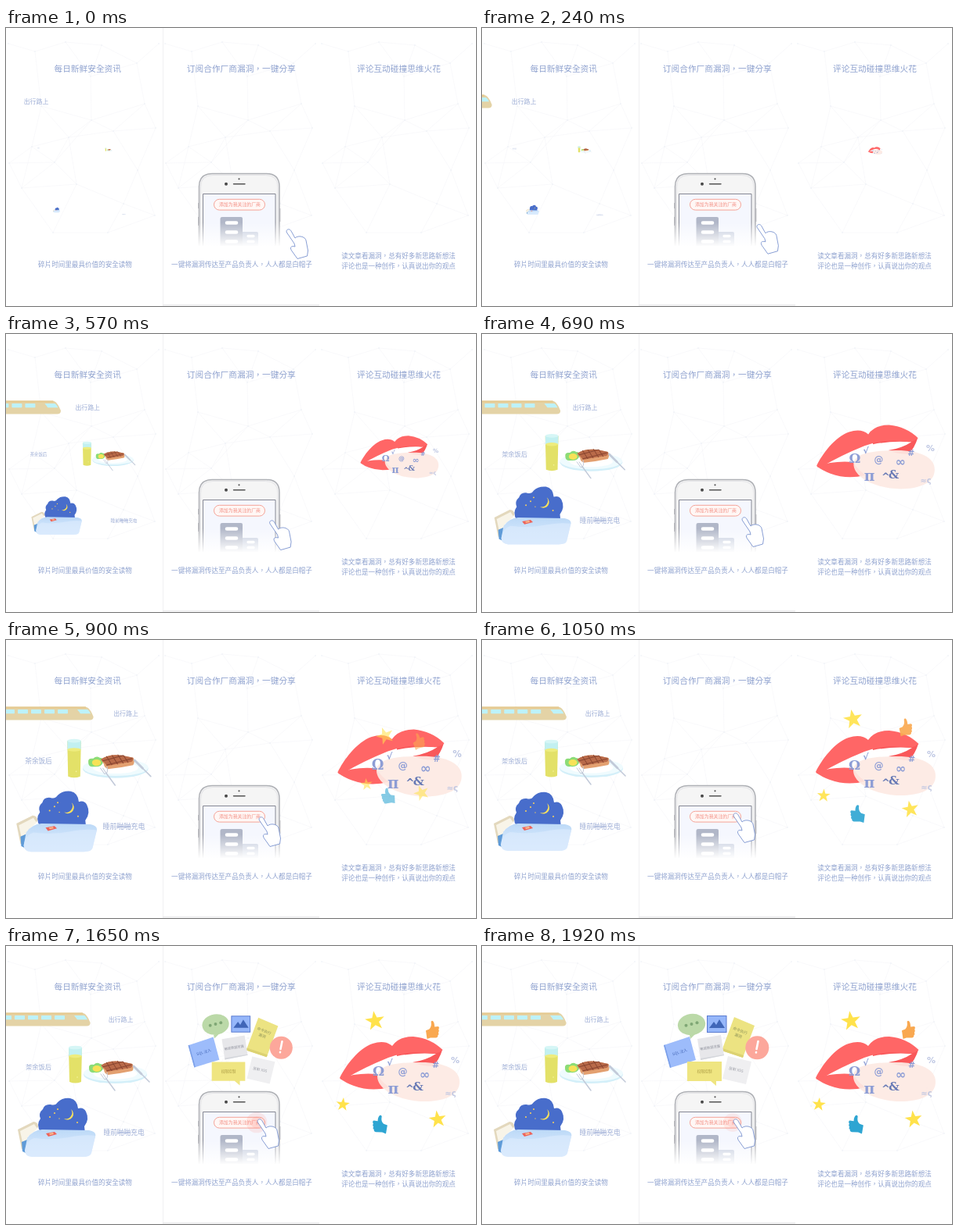
Recreate the animation shown at these times as an HTML page. Size 600 by 356 pixels, loop 8000 ms.

```html
<!DOCTYPE html>
<html lang="zh-TW">
<head>
<meta charset="utf-8">
<style>
html, body { margin: 0; width: 100%; height: 100%; overflow: hidden; background: #fff; }
svg { display: block; width: 600px; height: 356px; }
text { font-family: "Noto Sans CJK TC", "Noto Sans CJK", sans-serif; fill: #8fa2cf; text-anchor: middle; }
.title { font-size: 10.7px; }
.note { font-size: 8.57px; }
.label { font-size: 8.3px; fill: #9dadd5; }
.card { font-size: 4.8px; }
.sym text { font-family: "DejaVu Sans", sans-serif; fill: #8d9dd5; font-weight: bold; }
.sym .serif { font-family: "DejaVu Serif", serif; }
</style>
</head>
<body>
<svg viewBox="0 0 600 356">
  <defs>
    <linearGradient id="fade" x2="0" y2="1">
      <stop stop-color="#fff" stop-opacity="0"/><stop offset="1" stop-color="#fff"/>
    </linearGradient>
    <linearGradient id="quilt" x2="0" y2="1">
      <stop stop-color="#bcd9f7"/><stop offset=".5" stop-color="#cfe4fb"/><stop offset="1" stop-color="#d8eafd"/>
    </linearGradient>
    <path id="thumb" d="M-9 0L-4-1C0-4 0-7 0-10C2-13 5-10 4-3L9-3C11-2 10 0 9 1C10 3 9 4 8 5C9 7 8 8 7 8C7 10 6 11 4 11L-4 10L-9 11Z"/>
  </defs>

  <g id="net" stroke="#f6f7fa" stroke-width=".7" fill="#ebeef5"></g>
  <path d="M200.5 0V356" stroke="#f0f0f2"/>
  <path d="M200 354.7H400" stroke="#ebebed" stroke-width="1.6"/>

  <text class="title" x="104.2" y="56">每日新鲜安全资讯</text>
  <text class="title" x="300.3" y="56">订阅合作厂商漏洞，一键分享</text>
  <text class="title" x="501.5" y="56">评论互动碰撞思维火花</text>
  <text class="note" x="101" y="306">碎片时间里最具价值的安全读物</text>
  <text class="note" x="301" y="306">一键将漏洞传达至产品负责人，人人都是白帽子</text>
  <text class="note" x="501" y="295">读文章看漏洞，总有好多新思路新想法</text>
  <text class="note" x="501" y="307.5">评论也是一种创作，认真说出你的观点</text>

  <!-- Train -->
  <g id="train">
    <path d="M-20 85.5H97C102 86 105 92 107.5 98Q108 102 103 102.5H-20Z" fill="#e4d3a6"/>
    <path d="M-20 86.5H98" stroke="#e6c98f" stroke-width="2"/>
    <g id="windows" fill="#bdf2f9"></g>
    <path d="M87 89H100Q103 91 104 94.3H91Z" fill="#bdf2f9"/>
  </g>
  <text class="label" id="trainText" x="146.5" y="97" style="font-size:7.9px">出行路上</text>

  <!-- Meal -->
  <g id="meal">
    <path d="M80 130L81 174Q88.5 177 96 174L97 130Z" fill="#e3e168"/>
    <path d="M80 130L80.2 141Q88.5 144 96.800 141L97 130Z" fill="#c2f0f1"/>
    <ellipse cx="88.5" cy="130" rx="8.5" ry="2.3" fill="#d6f6f6"/>
    <ellipse cx="88.5" cy="141" rx="8.2" ry="2.2" fill="#eeec7d"/>
    <circle cx="91" cy="168" r=".8" fill="#f5f3a0"/>
    <ellipse cx="139.5" cy="164.5" rx="40.5" ry="11.5" fill="#d3eff9"/>
    <ellipse cx="139.5" cy="163" rx="40.5" ry="10.5" fill="#effbfe"/>
    <ellipse cx="139.5" cy="163.5" rx="28" ry="7" fill="#fff"/>
    <path d="M106 157Q105 151 112 152Q116 148 120 151Q126 151 124 157Q122 163 113 162Q106 163 106 157Z" fill="#8cdc77"/>
    <ellipse cx="116" cy="157" rx="5.5" ry="4" fill="#f7e258"/>
    <g transform="translate(1.2 0)">
      <path d="M120 153Q130 146 146 148L160 151Q163 155 160 160Q146 163 129 165Q124 163 124 159Z" fill="#e3a070"/>
      <path d="M120 153Q130 146 146 148L160 151Q161 154 158 156Q143 158 128 161Q124 156 120 153Z" fill="#b96a49"/>
      <path d="M127 149L134 160M134 148L141 159M141 147L148 158M148 148L154 157M122 155L148 148M127 160L159 152" stroke="#87442f"/>
    </g>
    <g stroke="#c2cad9" stroke-linecap="round" fill="none">
      <path d="M128 170L139 185" stroke-width="1.5"/>
      <path d="M121 164L126 171Q131 171 129 162M124 164L128 170"/>
      <path d="M163 154L173 164" stroke-width="2.8"/><path d="M173 164L183 174" stroke-width="1.6"/>
    </g>
  </g>
  <text class="label" id="mealText" x="41.5" y="157.5">茶余饭后</text>

  <!-- Bed -->
  <g id="bed">
    <path d="M44 238Q38 229 44 221Q41 214 47 209Q49 202 57 203Q63 205 66 200Q72 194 82 195Q91 197 92 208Q99 206 102 212Q107 222 100 231L101 240Z" fill="#486dcb"/>
    <path d="M83 209A7.5 7.5 0 1 1 74 221A8 8 0 0 0 83 209Z" fill="#ffe35a"/>
    <g fill="#f8d05d"><circle cx="66" cy="209" r="1"/><circle cx="62" cy="214" r="1"/><circle cx="56" cy="219" r="1"/><circle cx="91" cy="226" r="1"/><circle cx="68" cy="221" r=".7"/></g>
    <path d="M15 235L35 225Q41 225 41 232L28 240L27 264L20 260Z" fill="#e3d8bd"/>
    <path d="M18 237L36 228L40 234L28 244L27 260L22 256Z" fill="#f8f4e8"/>
    <path d="M20 251L27 248L29 267L21 263Z" fill="#5f9bd8"/>
    <path d="M27 246Q34 236 46 235L106 236Q116 238 114 244L109 265Q108 270 98 270L33 270Q24 269 24 262Z" fill="url(#quilt)"/>
    <path d="M24 262Q26 249 36 246Q60 249 80 245T114 243L109 265Q108 270 98 270L33 270Q25 269 24 262Z" fill="#dcecfd" opacity=".65"/>
    <path d="M51 240L62 238L65 241L54 244Z" fill="#ee6359"/><path d="M55 240L60 239L61 241L56 242Z" fill="#f8bb8d"/>
  </g>
  <text class="label" id="bedText" x="150.5" y="242.3" style="font-size:8.7px">睡前<tspan text-decoration="line-through">啪啪</tspan>充电</text>

  <!-- Phone -->
  <g stroke="#aeb0b5" fill="#fff">
    <path d="M246.5 290V203Q246.5 186.5 263 186.5H332.500Q349 186.5 349 203V290Z" stroke-width="1.5" fill="#f2f2f3"/>
    <path d="M248.5 290V204Q248.5 188.5 264 188.5H331.500Q347 188.5 347 204V290Z" stroke="#e0e0e2" stroke-width=".8" fill="#f5f5f5"/>
    <path d="M245.8 224V231M245.8 242V253M349.800 231V248"/>
    <path d="M251.5 290V212.5H344V290Z" stroke="#858793" fill="#f5f7fe"/>
  </g>
  <circle cx="297.5" cy="193.3" r="1.1" fill="#555"/><circle cx="281" cy="199.7" r="2" fill="#484848"/>
  <path d="M290.5 199.7H305" stroke="#555" stroke-width="1.4" stroke-linecap="round"/>
  <path d="M273.5 285V244Q273.5 242 276 242H300Q302 242 302 244V285Z" fill="#b1b7c8"/>
  <path d="M302 285V261H320Q322 261 322 263V285Z" fill="#c3cbdd"/>
  <path d="M282 249.5H294M282 261.5H294M282 273.5H294" stroke="#fff" stroke-width="4.6" stroke-linecap="round"/>
  <path d="M309 266.5H316M309 273.5H316" stroke="#fff" stroke-width="3.3" stroke-linecap="round"/>
  <rect x="240" y="249" width="115" height="31" fill="url(#fade)"/>
  <rect x="240" y="279" width="115" height="15" fill="#fff"/>
  <rect x="265.5" y="219.3" width="65" height="13.8" rx="6.9" fill="#fff7f5" stroke="#f5a398"/>
  <text x="298.5" y="228.4" style="font-size:5.9px;fill:#f28d82">添加为我关注的厂商</text>
  <g id="glow" fill="#ff7468"><circle cx="320" cy="226" r="14" opacity=".17"/><circle cx="320" cy="226" r="8" opacity=".2"/></g>
  <path id="hand" d="M321.5 226C319.5 222 325 220 327 224L332 233C336 229 345 231 346 236L348.500 249L347.500 256L335 259.500L329 251C324 245 327 242.5 332 244L331 240Z" fill="#fff" stroke="#7b93d0" stroke-width=".9" stroke-linejoin="round"/>

  <!-- Cards -->
  <g class="pop" data-at="267,102">
    <path d="M265 114L266 119L273 112Z" fill="#bbd9a8"/><ellipse cx="267.5" cy="100.5" rx="17.7" ry="13.6" fill="#bbd9a8" transform="rotate(-8 267 100)"/>
    <g fill="#7fa775"><circle cx="260.5" cy="101.8" r="2"/><circle cx="267.5" cy="100" r="2"/><circle cx="274.5" cy="98.2" r="2"/></g>
  </g>
  <g class="pop" data-at="300,100">
    <rect x="287.5" y="89.5" width="24.500" height="21" fill="#96b7fa" stroke="#5a7bd0"/>
    <path d="M290 105L296 97L299 101L303 94L310 105Z" fill="#4066b8"/>
  </g>
  <g class="pop" data-at="327,117">
    <path d="M322 91L348 102L333 143L306 134Z" fill="#ece382"/><path d="M306 134L333 143L334 140L307 131Z" fill="#dcd272"/>
    <g transform="translate(329 110) rotate(22)"><text class="card" style="fill:#90955a">命令执行</text><text class="card" y="7" style="fill:#90955a">漏洞</text></g>
  </g>
  <g class="pop" data-at="252.5,136">
    <path d="M232 127L265 116L273 146L240 156Z" fill="#9dbcfb"/><path d="M232 127L233.500 126.500L241.500 155.500L240 156Z" fill="#7b9fe8"/>
    <text class="card" transform="translate(253 137.5) rotate(-17)" style="fill:#4669b9">SQL 注入</text>
  </g>
  <g class="pop" data-at="292,130">
    <path d="M275 119L305 114L309 140L279 146Z" fill="#e7e7ea"/><path d="M279 146L309 140L309 139L279 144Z" fill="#d4d6db"/>
    <text class="card" transform="translate(291.5 131.5) rotate(-9)" style="fill:#9395a0;font-size:4.3px">敏感数据泄露</text>
  </g>
  <g class="pop" data-at="351,130.5">
    <circle cx="351.3" cy="130.3" r="15" fill="#fca79b"/>
    <path d="M352.5 122L350.5 132M350 136L349.9 136.5" stroke="#fff" stroke-width="2.6" stroke-linecap="round"/>
  </g>
  <g class="pop" data-at="284,162">
    <path d="M262 148H306V173H299V179L292 173H262Z" fill="#efe581"/>
    <text class="card" x="284" y="162" style="fill:#ad9d45">权限控制</text>
  </g>
  <g class="pop" data-at="325,159">
    <path d="M314 141L344 148L337 177L307 170Z" fill="#efeff1"/>
    <text class="card" transform="translate(324 160) rotate(12)" style="fill:#999ba4">反射 XSS</text>
  </g>

  <!-- Mouth -->
  <g id="mouth">
    <path d="M428 170Q455 153 490 141Q520 133 552 136L546 154L490 181Q445 178 428 170Z" fill="#fff"/>
    <path d="M499 137Q525 127 557 133Q553 146 545 154Q531 154 519 149Q537 146 549 138Q523 136 499 141Z" fill="#f9585a"/>
    <path d="M426 169C433 154 450 131 468 125Q484 120 493 128Q501 116 520 116Q542 118 557.500 133Q553 137 546 138Q515 133 488 143Q456 156 433 170Q428 173 426 169Z" fill="#ff6666"/>
    <path d="M427 170Q446 162 473 164Q480 174 489 181Q466 187 444 179Q433 175 427 170Z" fill="#ff6666"/>
    <path d="M474 167C474 152 500 149 530 149C560 149 579 158 579 174C579 191 560 198 539 199C505 200 474 185 474 167Z" fill="#fdeae3" opacity=".93"/>
    <g class="sym" id="symbols"></g>
  </g>
  <g id="sparks"></g>
</svg>

<script>
const NS = 'http://www.w3.org/2000/svg';
const $ = id => document.getElementById(id);
const LOOP = 8000;

function add(parent, tag, attrs, text = '') {
  const el = parent.appendChild(document.createElementNS(NS, tag));
  for (const name in attrs) el.setAttribute(name, attrs[name]);
  el.textContent = text;
  return el;
}

// Smooth curve through [time, value] keys, flat at both ends.
function track(t, keys) {
  const last = keys.length - 1;
  if (t <= keys[0][0]) return keys[0][1];
  if (t >= keys[last][0]) return keys[last][1];
  const slope = i => i === 0 || i === last ? 0
    : (keys[i + 1][1] - keys[i - 1][1]) / (keys[i + 1][0] - keys[i - 1][0]);
  const i = keys.findIndex(k => k[0] > t) - 1;
  const [t0, a] = keys[i], [t1, b] = keys[i + 1], d = t1 - t0, u = (t - t0) / d, v = 1 - u;
  return v * v * ((1 + 2 * u) * a + u * d * slope(i)) + u * u * ((3 - 2 * u) * b - v * d * slope(i + 1));
}

const nodes = [[3, 20], [37, 30], [76, 18], [122, 22], [195, 20], [167, 45], [108, 62], [177, 97],
  [109, 118], [137, 132], [191, 128], [33, 152], [4, 173], [62, 172], [90, 200], [168, 182],
  [150, 225], [190, 240], [60, 262], [130, 262], [45, 100], [20, 205], [80, 140]];
for (const left of [0, 200, 400]) nodes.forEach(([x, y], i) => {
  nodes.slice(i + 1).forEach(([p, q]) => {
    if (Math.hypot(p - x, q - y) < 72) add($('net'), 'path', { d: `M${left + x} ${y}L${left + p} ${q}` });
  });
  add($('net'), 'circle', { cx: left + x, cy: y, r: .8, stroke: 'none' });
});

for (let x = -6; x < 70; x += 17) add($('windows'), 'rect', { x, y: 89, width: 13, height: 5.3, rx: .8 });

for (const [char, x, y, size, tone] of [['Ω', 475.5, 165.5, 17], ['√', 490, 153, 11], ['@', 506.5, 165, 12],
  ['∞', 534.5, 169.5, 16], ['#', 548.5, 156, 11], ['%', 573.5, 150, 11, '#bcc5e2'], ['π', 494.5, 188.5, 19],
  ['^', 515.5, 187, 13, '#6679b5'], ['&', 526, 185, 15, '#6679b5'], ['≈ς', 567.5, 192, 10, '#c2c8e2']]) {
  const el = add($('symbols'), 'text', { x, y, class: 'Ωπ&'.includes(char) ? 'serif' : '' }, char);
  el.style.fontSize = size + 'px';
  if (tone) el.style.fill = tone;
}

function star(r) {
  return 'M' + Array.from({ length: 10 }, (_, i) => {
    const a = i * Math.PI / 5, q = i % 2 ? r * .4 : r;
    return (q * Math.sin(a)).toFixed(1) + ' ' + (-q * Math.cos(a)).toFixed(1);
  }).join('L') + 'Z';
}
// Offset from the mouth's centre, radius (0 for a thumb), colour, tilt, horizontal flip
const sparks = [[-31, -64, 13, '#ffe24b', -8, 1], [-72, 43, 9, '#ffe24b', 6, 1], [49, 62, 11.5, '#ffe24b', -8, 1],
  [42, -53, 0, '#f9a850', -8, .9], [-24, 68, 0, '#2ea5d2', 10, -1]].map(([x, y, r, fill, tilt, flip]) => {
  const el = r ? add($('sparks'), 'path', { d: star(r), fill }) : add($('sparks'), 'use', { href: '#thumb', fill });
  return { el, x, y, tilt, flip };
});

const rest = [[450, .37], [690, .985], [750, 1.05], [810, 1.045], [900, 1.035], [1050, 1]];
const growKeys = [[0, .085], ...rest], mouthKeys = [[0, 0], ...rest];
const trainKeys = [[0, -112], [450, -64.5], [690, -7.5], [780, 3], [900, 4], [1080, 0]];
const textKeys = [[0, -108], [450, -66], [690, -15], [810, 4], [900, 6.5], [1110, 0]];
const handX = [[0, 37], [450, 20], [690, 11], [900, 2], [1020, 0]];
const handY = [[0, 36], [450, 21], [690, 13], [900, 5], [1050, 0]];
const sparkKeys = [[700, 0], [900, .58], [1140, 1]];
const cardKeys = [[1230, 0], [1410, .39], [1650, .97], [1770, 1.04], [1920, 1]];
const glowKeys = [[1320, 0], [1500, .5], [1650, .95], [1800, .9], [1920, .85]];
const glowFade = [[1320, .4], [1650, .8], [1920, .65]];

const shift = (el, x, y = 0) => el.setAttribute('transform', `translate(${x} ${y})`);
const zoom = (el, x, y, s) => el.setAttribute('transform', `translate(${x} ${y}) scale(${s}) translate(${-x} ${-y})`);
const cards = [...document.querySelectorAll('.pop')].map(el => [el, ...el.dataset.at.split(',').map(Number)]);

function draw(t) {
  shift($('train'), track(t, trainKeys));
  shift($('trainText'), track(t, textKeys));
  const grow = track(t, growKeys);
  zoom($('meal'), 131, 156, grow);
  zoom($('mealText'), 41.5, 154, grow);
  zoom($('bed'), 64.5, 233, grow);
  zoom($('bedText'), 150.5, 239, grow);
  zoom($('mouth'), 502, 157, track(t, mouthKeys));
  shift($('hand'), track(t, handX), track(t, handY));

  const out = track(t, sparkKeys), size = .75 + .25 * out;
  for (const { el, x, y, tilt, flip } of sparks) {
    const turn = tilt - 30 * (1 - out);
    el.setAttribute('transform', `translate(${502 + x * out} ${160 + y * out}) rotate(${turn}) scale(${size * flip} ${size})`);
    el.setAttribute('opacity', out);
  }
  const pop = track(t, cardKeys);
  for (const [el, x, y] of cards) zoom(el, x, y, pop);
  zoom($('glow'), 320, 226, track(t, glowKeys));
  $('glow').setAttribute('opacity', track(t, glowFade));
}

let start;
function tick(now) {
  start ??= now;
  draw((now - start) % LOOP);
  requestAnimationFrame(tick);
}
draw(0);
requestAnimationFrame(tick);
</script>
</body>
</html>
```
